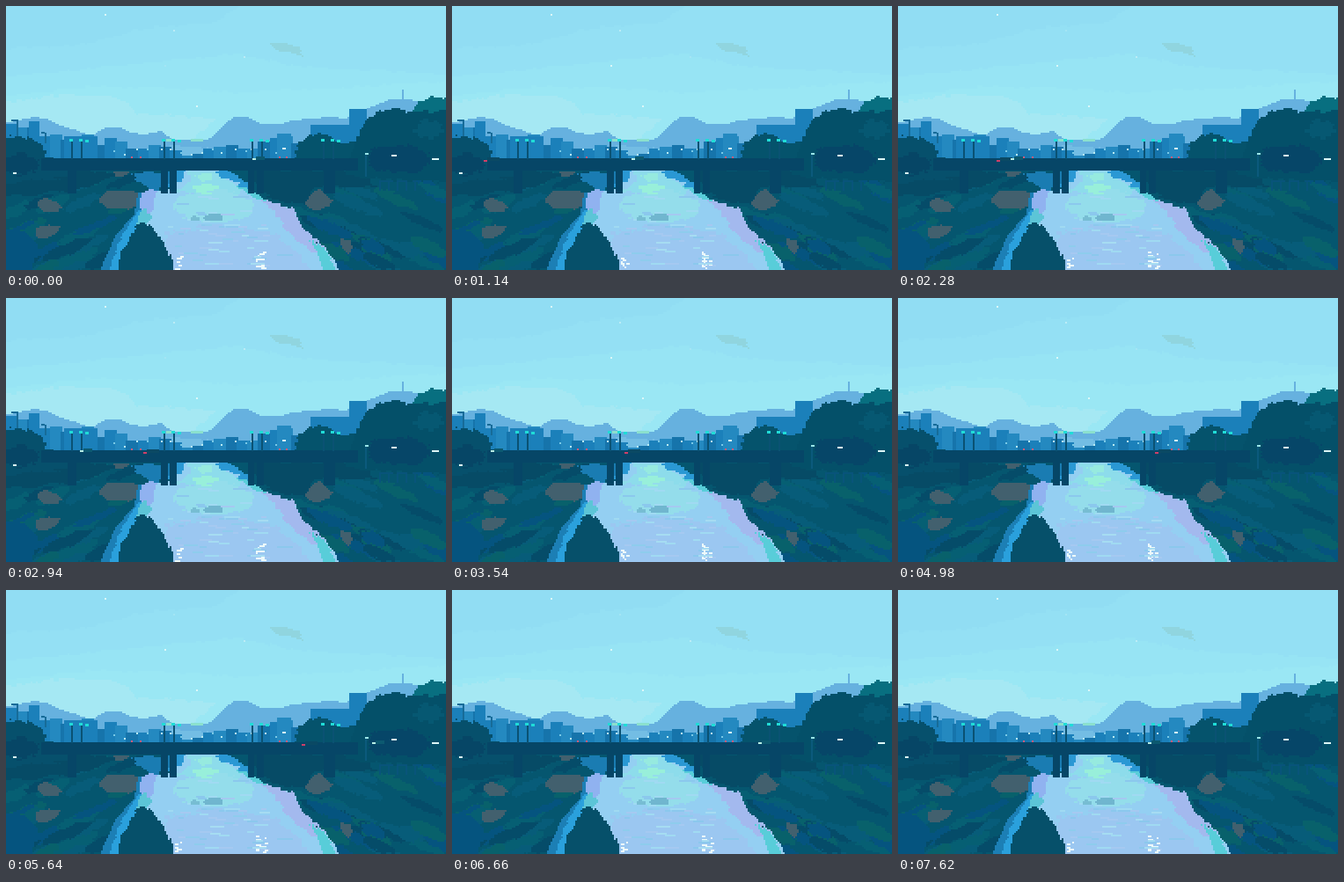
Animation of 500x300 px, one loop 7680 ms. Source, as an HTML page with a canvas:

```html
<!DOCTYPE html>
<html lang="en">
<head>
<meta charset="utf-8">
<title>River at dusk</title>
<style>
html, body { margin: 0; width: 500px; height: 300px; overflow: hidden; background: #94e1f5; }
canvas { display: block; }
</style>
</head>
<body>
<canvas id="stage" width="500" height="300"></canvas>
<script>
const W = 500, H = 300, CELL = 2, STEP = 60, STEPS = 128;
const stage = document.getElementById('stage').getContext('2d');
const backdrop = document.createElement('canvas');
backdrop.width = W;
backdrop.height = H;
let ctx = backdrop.getContext('2d');

function hash(x, y) {
  const v = Math.sin(x * 12.9898 + y * 78.233) * 43758.5453;
  return v - Math.floor(v);
}

const snap = v => Math.floor(v / CELL) * CELL;
const lerp = (a, b, p) => a + (b - a) * p;

function rect(color, x, y, w, h) {
  ctx.fillStyle = color;
  ctx.fillRect(x, y, w, h);
}

function inside(pts, x, y) {
  let hit = false;
  for (let i = 0, j = pts.length - 1; i < pts.length; j = i++) {
    const [ax, ay] = pts[i], [bx, by] = pts[j];
    if (ay > y !== by > y && x < (bx - ax) * (y - ay) / (by - ay) + ax) hit = !hit;
  }
  return hit;
}

// Fills a polygon cell by cell; rough displaces the edge in small clumps.
function fill(color, pts, rough = 0) {
  const bounds = (axis, size) => {
    const values = pts.map(p => p[axis]);
    return [Math.max(0, snap(Math.min(...values) - rough)), Math.min(size, Math.max(...values) + rough)];
  };
  const [x0, x1] = bounds(0, W), [y0, y1] = bounds(1, H);
  for (let y = y0; y < y1; y += CELL) {
    for (let x = x0; x < x1; x += CELL) {
      const gx = x / 6 | 0, gy = y / 4 | 0;
      const dx = rough * (hash(gx, gy) - .5), dy = rough * (hash(gx + 57, gy) - .5);
      if (inside(pts, x + 1 + dx, y + 1 + dy)) rect(color, x, y, CELL, CELL);
    }
  }
}

// Points on the stage border move outward so that rough edges leave no gaps there.
function poly(color, path, rough) {
  const bleed = (v, size) => v <= 0 ? v - 20 : v >= size ? v + 20 : v;
  fill(color, path.split(' ').map(p => {
    const [x, y] = p.split(',').map(Number);
    return [bleed(x, W), bleed(y, H)];
  }), rough);
}

function blob(color, cx, cy, rx, ry, rough = 4, tilt = 0) {
  fill(color, Array.from({ length: 14 }, (_, i) => {
    const a = i * Math.PI / 7, dx = Math.cos(a) * rx;
    return [cx + dx, cy + Math.sin(a) * ry + dx * tilt];
  }), rough);
}

function drawSky() {
  rect('#94e0f4', 0, 0, W, H);
  poly('#91ddf3', '0,0 290,0 240,18 150,26 90,44 0,50', 3);
  poly('#97e4f4', '0,82 150,66 260,54 340,70 500,78 500,180 0,180', 3);
  poly('#9ae7f4', '0,104 90,92 170,92 260,98 400,92 500,84 500,180 0,180', 3);
  poly('#a5e8f3', '0,112 70,100 130,104 150,122 240,128 200,160 0,160', 4);
  poly('#90d5df', '300,42 318,42 334,47 337,57 320,53 306,51', 2);
}

function drawHills() {
  poly('#66b1df', '0,136 14,130 34,126 48,129 62,136 80,141 96,148 112,139 127,137 142,144 158,146 '
    + '176,142 190,152 205,151 218,155 232,150 250,133 259,126 275,126 290,134 310,135 326,130 '
    + '345,128 370,126 386,128 410,117 434,107 452,105 475,110 500,110 500,180 0,180');
  poly('#73bde4', '170,162 200,159 228,160 250,168 250,176 160,176', 3);
  rect('#8be0cd', 182, 151, 10, 3);
  rect('#8be0cd', 210, 151, 14, 3);
  rect('#66b1df', 450, 95, 2, 12);
}

// The skyline gets lower towards the middle of the valley.
function drawCity() {
  const tones = ['#1b80ba', '#2489c0', '#1674ab'];
  for (let i = 0; i < 27; i++) {
    const x = i * 12.5, top = snap(171 - Math.abs(x - 205) * .16 + 12 * (hash(i, 3) - .5));
    rect(tones[i % 3], snap(x), top, 14, 178 - top);
  }
  rect(tones[0], 26, 131, 12, 46);
  rect(tones[0], 66, 148, 38, 30);
  rect(tones[1], 308, 145, 16, 32);
  rect(tones[0], 346, 135, 46, 42);
  rect(tones[0], 390, 117, 20, 60);
  for (let i = 0; i < 16; i++) {
    const x = 122 + i * 12 + snap(hash(i, 2) * 8);
    rect(i % 3 ? '#b8eaf1' : '#78c9e6', x, 162 + snap(hash(i, 8) * 8), 2, 2);
  }
  for (const x of [142, 152, 310, 318]) rect('#d35b79', x, 171, 2, 2);
  rect('#d6f5f6', 314, 161, 4, 2);
}

function drawBanks() {
  rect('#05566f', 0, 178, W, 122);
  const tones = ['#054c69', '#065f73', '#05547f', '#075c79', '#08616b'];
  for (let i = 0; i < 64; i++) {
    const left = i % 2, y = lerp(196, 300, hash(i, 11)), spread = hash(i, 13);
    const x = left ? spread * (150 - (y - 200) * .4) : lerp(320 + (y - 200) * .6, W, spread);
    blob(tones[i % 5], x, y, 14 + 16 * hash(i, 5), 4 + 4 * hash(i, 6), 3, left ? -.4 : .4);
  }
  poly('#064b66', '0,178 68,184 130,190 90,206 24,216 0,214', 4);
  poly('#064b66', '276,186 400,186 420,206 350,206 336,226 304,220 286,208', 4);
  poly('#05547f', '0,258 20,254 36,274 26,300 0,300', 4);
  poly('#1a7cb2', '140,190 190,189 188,206 166,209 150,200', 4);
  const rock = '#42606e';
  poly(rock, '108,216 114,211 144,210 154,215 150,225 140,231 116,230 106,222', 1);
  poly(rock, '34,224 44,218 56,222 64,229 58,234 42,233', 1);
  poly(rock, '34,252 44,249 62,250 58,258 44,265 34,262', 1);
  poly(rock, '340,224 348,212 356,208 372,221 366,228 356,232 344,230', 1);
  poly(rock, '380,265 392,266 394,274 390,283 382,276', 1);
  poly(rock, '120,188 140,188 138,193 126,194', 1);
  rect('#08547a', 424, 198, 40, 2);
  for (let x = 424; x <= 464; x += 10) rect('#08547a', x, 198, 2, 12);
}

function drawRiver() {
  poly('#1c7fb5', '150,212 158,214 160,240 140,300 98,300 124,262 146,236');
  poly('#2aa0dc', '150,232 160,230 150,262 132,300 112,300 128,268', 2);
  poly('#94cff2', '192,186 246,186 258,196 274,206 284,215 304,225 326,230 334,248 348,265 364,277 '
    + '374,290 384,300 186,300 160,246 168,210 186,208', 1);
  poly('#2a98d4', '188,187 204,187 200,199 184,208', 2);
  poly('#2a98d4', '238,187 252,186 268,197 284,207 256,206 268,201 244,196', 2);
  poly('#8ddceb', '206,188 238,188 248,198 270,208 264,213 190,212 212,199', 3);
  blob('#94ddeb', 236, 228, 46, 18, 6);
  blob('#98efda', 229, 207, 16, 5, 5);
  blob('#96eadf', 226, 194, 10, 4, 4);
  poly('#9bc7f1', '180,260 236,248 306,258 336,284 350,300 188,300', 7);
  poly('#a3b9ee', '288,220 326,230 334,248 364,277 350,282 318,256 306,236', 4);
  poly('#58cdd9', '344,264 364,277 384,300 368,300 354,282', 2);
  poly('#58cdd9', '262,205 274,206 300,224 284,219', 1);
  poly('#90b2f0', '154,210 170,208 168,232 160,238 152,228', 3);
  poly('#5cc5d7', '150,238 158,230 166,240 158,250 148,250', 2);
  for (let i = 0; i < 40; i++) {
    const y = 216 + snap(hash(i, 4) * 80);
    const x = 184 + snap(hash(i, 9) * (90 + (y - 216) * .6));
    rect(['#a0daf2', '#8bc8ed', '#a5c9f1'][i % 3], x, y, 6 + 2 * (i % 7), 2);
  }
  blob('#70b6cf', 236, 240, 11, 5, 2);
  blob('#77bdd3', 214, 242, 6, 3, 2);
  poly('#06506a', '122,300 130,280 140,268 148,250 156,246 168,254 178,268 190,288 190,300', 3);
}

function drawTrees() {
  poly('#086f80', '456,124 470,110 484,103 500,107 500,150 450,150', 3);
  poly('#05536c', '328,180 332,158 340,151 354,145 368,148 380,155 398,155 410,180', 4);
  poly('#045069', '384,190 392,168 400,150 404,136 412,126 430,118 446,117 458,122 '
    + '470,118 486,120 500,116 500,202 410,196', 4);
  blob('#064668', 446, 174, 36, 16, 6);
  blob('#065872', 480, 140, 16, 10, 6);
  poly('#06506c', '0,151 10,147 24,150 32,155 42,158 48,172 72,178 72,194 0,204', 4);
  blob('#064666', 16, 180, 22, 12, 6);
}

function drawBridge() {
  const dark = '#064667';
  rect(dark, 40, 173, 360, 14);
  for (const [x, w] of [[70, 10], [176, 8], [186, 8], [275, 7], [285, 8], [361, 13]]) rect(dark, x, 186, w, 27);
  for (const x of [74, 179, 279, 360]) {
    for (const post of [x, x + 11]) {
      rect('#0a5273', post, 151, 2, 23);
      rect('#20dcd7', post - 2, 151, 4, 3);
    }
    rect('#20dcd7', x + 16, 152, 4, 3);
  }
  const iron = '#176b98';
  rect(iron, 6, 129, 8, 2);
  rect(iron, 12, 130, 2, 18);
  rect(iron, 40, 143, 4, 2);
  rect(iron, 44, 144, 2, 12);
  rect('#0b5a7c', 408, 168, 2, 26);
  rect('#9ae6e9', 408, 167, 4, 2);
  rect('#dcf6f6', 484, 173, 8, 2);
  rect('#dcf6f6', 8, 189, 4, 2);
}

function drawCars(k) {
  const out = (4 * k - 38 + 512) % 512;
  const back = (282 - 4 * k + 512) % 512;
  if (out >= 8 && out < 402) {
    rect('#0a4964', out + 2, 172, 14, 4);
    rect('#cf3f68', out - 2, 175, 4, 2);
  }
  if (back >= 10 && back < 422) {
    rect('#0c5970', back + 2, 171, 10, 4);
    rect('#b8eee5', back - 2, 173, 4, 2);
  }
}

function sparkle(x, y, w, h, count, phase) {
  for (let i = 0; i < count; i++) {
    const px = x + snap(hash(i, phase + 21) * w), py = y + snap(hash(i, phase + 43) * h);
    rect('#edfafa', px, py, 2 + 2 * (i % 2), 2);
  }
}

function drawGlints(phase) {
  sparkle(192, 284, 8, 16, 9, phase);
  sparkle(284, 279, 11, 19, 18, phase);
  for (let i = 0; i < 12; i++) {
    const x = 192 + snap(hash(i, 31) * 96) + 2 * (phase % 2);
    rect(i % 2 ? '#a6dcf2' : '#8ecced', x, 248 + i * 4, 8 + i % 3 * 4, 2);
  }
  const stars = [[112, 9, 2], [180, 67, 0], [190, 27, 3], [270, 57, 1], [216, 113, 2]];
  stars.forEach(([x, y, dim], i) =>
    rect(phase === dim ? '#a4e5f4' : i === 2 || i === 3 ? '#bcecf6' : '#dcf8f8', x, y, 2, 2));
  rect(phase === 2 ? '#8ed0dc' : '#e3f8f6', 438, 169, 6, 2);
}

[drawSky, drawHills, drawCity, drawBanks, drawRiver, drawTrees, drawBridge].forEach(draw => draw());
ctx = stage;

function render(time) {
  const k = Math.floor(time / STEP) % STEPS;
  ctx.drawImage(backdrop, 0, 0);
  drawCars(k);
  drawGlints(Math.floor(k % 8 / 2));
}

const start = performance.now();
function tick() {
  render(performance.now() - start);
  requestAnimationFrame(tick);
}
tick();
</script>
</body>
</html>
```
